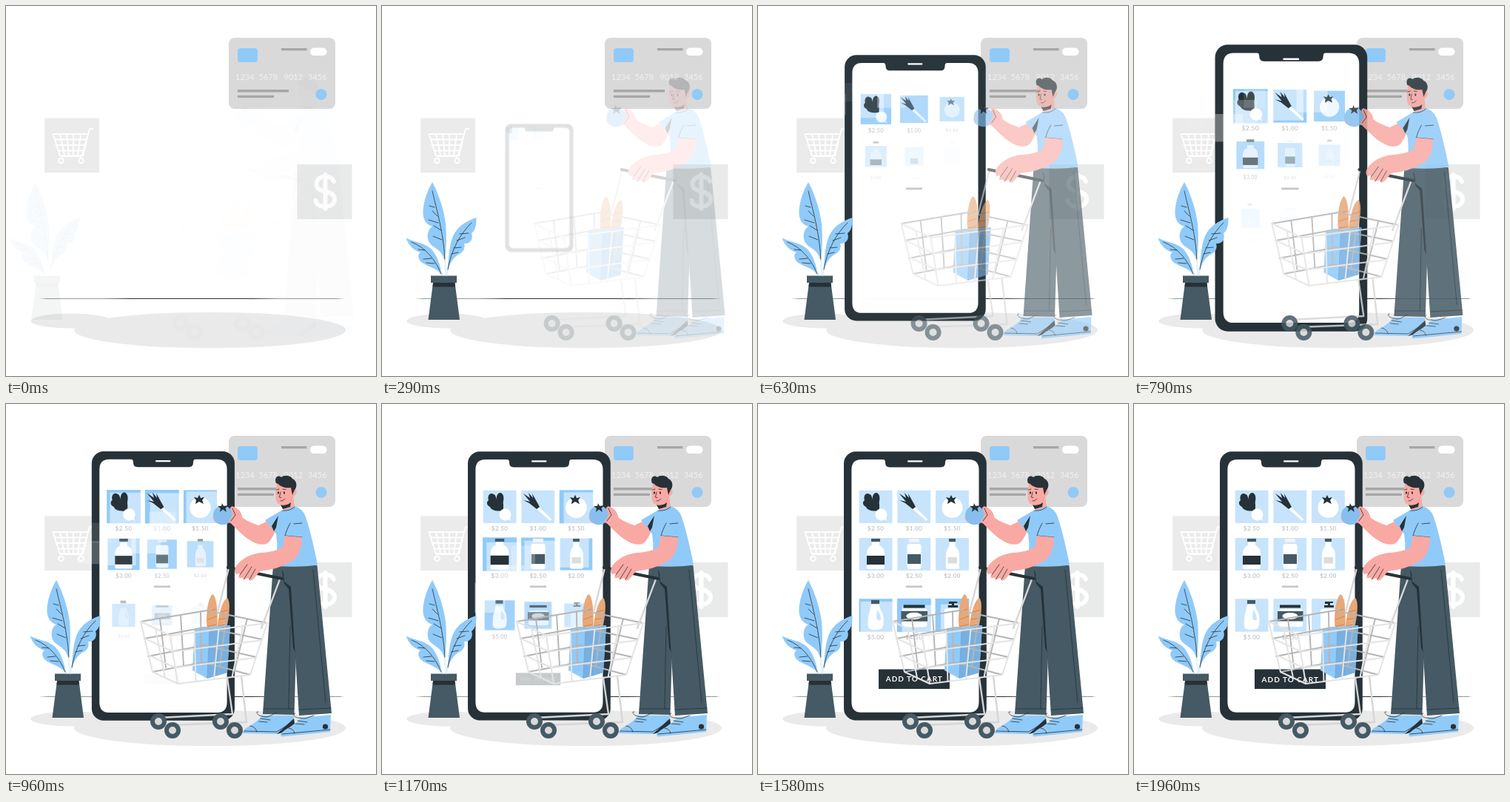
Recreate the animation shown at these times as an HTML page. Size 500 px wide and 500 px high, loop 2 s.

```html
<!DOCTYPE html>
<html lang="en">
<head>
<meta charset="utf-8">
<title>Online grocery shopping</title>
<style>
  html, body { margin: 0; width: 100%; height: 100%; overflow: hidden; background: #fff; }
  svg { display: block; width: 100vw; height: 100vh; }
  .part { transform-box: fill-box; transform-origin: center; }
  text { font-family: Lato, "Open Sans", sans-serif; }
  .price { font-size: 8px; letter-spacing: .4px; fill: #b3b3b3; text-anchor: middle; }
  .line { fill: none; stroke-linecap: round; stroke-linejoin: round; }
  .ink { fill: none; stroke: #263238; stroke-width: .8; stroke-linecap: round; stroke-linejoin: round; }
</style>
</head>
<body>
<svg viewBox="0 0 500 500">
  <!-- floor -->
  <ellipse cx="275.5" cy="438" rx="183.5" ry="24.3" fill="#eaeaea"/>
  <ellipse cx="88" cy="425.5" rx="54.5" ry="10" fill="#eaeaea"/>
  <ellipse cx="251" cy="395.5" rx="211" ry=".45" fill="#263238"/>

  <!-- bank card -->
  <rect x="301" y="43" width="144" height="96" rx="8" fill="#d9d9d9"/>
  <rect x="313" y="57" width="27" height="19" rx="4" fill="#90caf9"/>
  <path d="M372 57h34.500v3.300h-34.500zM313 113h69v3.500h-69zM313 120.800h49v3.300h-49z" fill="#a6a6a6"/>
  <rect x="411" y="56.500" width="22.500" height="10.500" rx="5.200" fill="#fff"/>
  <g fill="#f0f0f0" font-size="11">
    <text x="310" y="100">1234</text><text x="341.500" y="100">5678</text>
    <text x="375.500" y="100">9012</text><text x="408" y="100">3456</text>
  </g>
  <circle cx="426" cy="119.500" r="7.500" fill="#90caf9"/>

  <!-- cart tile -->
  <rect x="52" y="151.500" width="74" height="73.500" fill="#ebebeb"/>
  <g class="line" stroke="#fff" stroke-width="1.900">
    <path d="M117.500 166.300H113L102.500 203H76M63.500 173H111L104 202.500H73ZM65.500 180.500H109M67.500 188H107M70 195.500H105.500M73 173L79 202M82 173L85 202M91 173V202M101 173L97 202"/>
    <circle cx="74.500" cy="209" r="3.300"/><circle cx="101.500" cy="209" r="3.300"/>
  </g>

  <!-- dollar tile -->
  <rect x="393.500" y="214" width="74" height="74" fill="#e9eaea"/>
  <path class="line" stroke="#fff" stroke-width="6" d="M443 237C441 232 437 230.500 431.500 230.500C424 230.500 419.500 235 419.500 240.500C419.500 247 425 249 431.500 250.500C439 252 444 255 444 261C444 267 439 271 431.500 271C424 271 419.500 268 418.500 263M431.500 228V274"/>

  <g id="screen">
    <g id="phone">
      <rect x="116" y="64.300" width="192.800" height="363.200" rx="16" fill="#263238"/>
      <path d="M139.400 75H169Q172 75 172 79Q172 85.500 178 85.500H247Q253 85.500 253 79Q253 75 256 75H285Q298.500 75 298.500 89V402.700Q298.500 416.700 285 416.700H139.400Q126.400 416.700 126.400 402.700V89Q126.400 75 139.400 75Z" fill="#fff"/>
    </g>
    <g id="marks">
      <rect class="part" x="202" y="76.200" width="20.500" height="2.300" rx="1.100" fill="#fff"/>
      <rect class="part" x="200" y="245.500" width="22" height="2.700" fill="#c7c7c7"/>
    </g>
    <g id="shelf"></g>
    <g id="button">
      <rect class="part" x="163" y="358.500" width="96" height="26.500" fill="#263238"/>
      <text class="part" x="211.300" y="375.500" fill="#fff" font-size="10" font-weight="700" letter-spacing="1" text-anchor="middle">ADD TO CART</text>
    </g>
  </g>

  <g id="plant">
    <path d="M69 374H98.500L105 424H62.500Z" fill="#455a64"/>
    <path d="M69 374H98.500L99 379.500H68.500Z" fill="#263238"/>
    <rect x="66" y="364.500" width="35" height="9.500" fill="#455a64"/>
    <g fill="#90caf9">
      <path d="M68 238C61 250 55 266 55.500 281C56 290 61 296 68 298C61 302 60 313 64 320C70 328 82 329 84.500 345C87 330 88 305 85 288C82 270 76 253 68 238Z"/>
      <path d="M32.500 313.500C36 323 42 330 52 333C47 336 49 344 56 348C64 353 74 354 81 364C79 350 74 335 65 327C57 320 43 319 32.500 313.500Z"/>
      <path d="M127.500 286C114 290 101 299 96 311C90 325 90 345 88 362C90 350 96 340 103 336C110 333 113 327 111 321C118 322 124 316 121 307C127 303 127.500 294 127.500 286Z"/>
    </g>
    <path class="line" stroke="#dbeefd" stroke-width="1.500" d="M85 343L86 364M88 352V364M78 357L82 364"/>
    <path class="ink" d="M68 250C74 276 83 306 85 342M64 270L71 272M63 289L76 293M69 311L81 316M75 284L68 277M80 303L70 297M40 319C58 326 72 342 80 362M49 329L58 330M56 342L67 341M60 347L71 348M121 293C106 307 93 331 89 356M105 308L117 307M101 317L112 313M97 327L107 326M94 335L103 333"/>
  </g>

  <g id="shopper">
    <!-- shoes -->
    <path d="M320 443C324 435 337 434 346 421H389L390 431L368 446L321 445Z" fill="#90caf9"/>
    <path d="M366 446L389 425L390 432L374 444Z" fill="#263238"/>
    <path d="M371 447C375 438 390 437 398 424L439 420L438 443L372 449.500Z" fill="#90caf9"/>
    <circle cx="431.500" cy="436" r="3.600" fill="#263238"/>
    <!-- trousers -->
    <path d="M361 218L347 419L389.500 420L392 335L400 218Z" fill="#455a64"/>
    <path d="M373 224L386 246L393 340L388 330L382 250L376 243Z" fill="#263238"/>
    <path d="M374 218H420.500L440 418L396 421L385 247L376 240Z" fill="#455a64"/>
    <path class="ink" d="M384 300L382 412M348 412H389M396 413L439 411M415 224L432 404M341 416C337 414 339 422 347 422C354 425 359 420 365 417M342 429L353 430M344 425L357 427M391 418C386 417 390 426 398 424C404 427 411 422 416 421M391 432L403 433M394 428L407 430M322 442L366 443L388 429M373 446L438 440M330 435Q337 436 339 443M382 438Q389 439 390 445"/>
    <!-- neck and head -->
    <path d="M374 128L388 122L390 142L375 147Z" fill="#f9a9a3"/>
    <path d="M371 136Q379 138 385 133L384 139L374 142Z" fill="#263238"/>
    <path d="M366 108C364 117 363.500 129 367 134C372 138.500 382 137 386 130L387 125C393 125 395 115 389 114V105H368Z" fill="#f9a9a3"/>
    <path d="M365 107C362 100 367 95 372 99C377 95 385 97 387 101C393 103 394 112 390 116L387 123L385 113C378 114 371 112 368 108Z" fill="#263238"/>
    <g fill="#263238"><ellipse cx="368" cy="120" rx="1.100" ry="1.700"/><ellipse cx="376" cy="120" rx="1.100" ry="1.700"/></g>
    <path class="ink" d="M365.500 116L369 115M374 115L378 115.500M371 119L369.500 126L372 126.500M371 131Q374 132 377 128"/>
    <!-- reaching arm and tomato -->
    <path d="M354 158L341 164C333 161 325 158 319 153C319 147 314 140 305 138L302 145L306 150L302 160C308 164 316 175 328 183C340 191 350 192 356 186C361 179 365 171 366 164Z" fill="#f9a9a3"/>
    <path d="M279.500 152Q279 159 287 162L294 159Z" fill="#f9a9a3"/>
    <circle cx="293" cy="150.200" r="13" fill="#86bfef"/>
    <path d="M286 138L291 138L292 134L294 138L300 137L296.500 141L298 146L293 142.500L289 146L290 141Z" fill="#263238"/>
    <path class="line" stroke="#f9a9a3" stroke-width="4" d="M305 141L309 149L303 159"/>
    <path class="ink" d="M306 141L310 150L304 158"/>
    <!-- shirt -->
    <path d="M372 144Q383 143 389 138Q399 140 404 150Q412 172 421 217Q407 221 361 219Q369 202 365 176L362 171L350 157Z" fill="#90caf9"/>
    <path d="M368 151L359 165L362 172L365 167Z" fill="#263238"/>
    <path class="ink" d="M384 161Q379 170 377 178L400 180M389 162L400 161M373 144Q384 145 390 139"/>
    <!-- bag and bread -->
    <path d="M272 305C269 286 273 262 279 257C285 259 287 285 285 307Z" fill="#e8a879"/>
    <path d="M285 308C286 290 291 266 299 262C304 266 302 290 296 310Z" fill="#e8a879"/>
    <path class="line" stroke="#c98652" d="M274 281L283 277M273 291L284 287M273 300L284 298M291 281L301 278M288 291L300 289M287 300L298 298"/>
    <path d="M255 303L303 299L299 363L272 371L252 360Z" fill="#90caf9"/>
    <path d="M275 306L303 299L299 363L272 371Z" fill="#78b0e1"/>
    <path class="line" stroke="#6ca4d5" stroke-width=".8" d="M275 306L272 370M288 304L284 366"/>
    <!-- trolley -->
    <g class="line">
      <path stroke="#b5b5b5" stroke-width="1.900" d="M182 294L272 279L353 296M187 317L268 302L346 318M192 341L268 326L338 342M198 362L267 349L330 366M208 290L216 356M236 285L240 353M263 280L264 350M298 285L289 354M326 290L309 360"/>
      <path stroke="#d6d6d6" stroke-width="2.300" d="M301 222L286 281M370 237L345 303M299 370L306 419L206 424M318 368L325 430L218 434"/>
      <path id="basket" stroke="#e3e3e3" stroke-width="2"/>
    </g>
    <g fill="#d9d9d9" stroke="#455a64" stroke-width="6">
      <circle cx="206" cy="429" r="8"/><circle cx="225" cy="441" r="8"/>
      <circle cx="290" cy="429" r="8"/><circle cx="309" cy="441" r="8"/>
    </g>
    <path class="line" stroke="#263238" stroke-width="4" d="M300 221L373 236"/>
    <!-- near arm -->
    <path d="M377 178L374 193Q367 199 346 201C332 202 319 208 311 219Q307 226 311 230L316 229L314 235L320 235L321 238L327 235L330 239C336 237 339 230 343 226Q367 224 387 212Q400 202 400 180Z" fill="#f9a9a3"/>
    <path class="ink" d="M326 217L316 231M332 220L322 236M337 223L329 237"/>
  </g>
</svg>
<script>
const $ = id => document.getElementById(id);
const LOOP = 2000, SPAN = 1000, START = -37, STEP = 94;
const DARK = '#263238', SLATE = '#455a64';

// Trolley front: grid between four corners.
const mix = (a, b, u) => [a[0] + (b[0] - a[0]) * u, a[1] + (b[1] - a[1]) * u];
function grid(tl, tr, br, bl, cols, rows) {
  let d = '';
  const seg = (a, b) => { d += `M${a}L${b}`; };
  for (let i = 0; i <= cols; i++) seg(mix(tl, tr, i / cols), mix(bl, br, i / cols));
  for (let i = 0; i <= rows; i++) seg(mix(tl, bl, i / rows), mix(tr, br, i / rows));
  return d;
}
$('basket').setAttribute('d',
  grid([222, 313], [353, 296], [330, 366], [232, 378], 4, 3) +
  grid([182, 294], [222, 313], [232, 378], [198, 362], 2, 3));

// Product drawings; every piece grows around its own centre.
const shape = (d, fill = '#fff') => `<path class="part" d="${d}" fill="${fill}"/>`;
const box = (x, y, w, h, fill = '#fff', r = 0) =>
  `<rect class="part" x="${x}" y="${y}" width="${w}" height="${h}" rx="${r}" fill="${fill}"/>`;
const disc = (x, y, r, fill = '#fff') => `<circle class="part" cx="${x}" cy="${y}" r="${r}" fill="${fill}"/>`;

const items = [
  ['$2.50', shape('M164 144C158 145 148 145 146 139C141 137 141 132 144 130C142 124 146 119 151 122C154 123 154 127 155 129C154 122 159 117 163 122C166 127 163 132 164 136Z', DARK)
    + disc(166.5, 149.5, 8) + shape('M168 155L175 158L171 153Z')],
  ['$1.00', shape('M207 140L210 137L229.500 156L227 158Z')
    + shape('M191 121L200 127L198 120L204 127L203 121L213 139L209 142L199 134L191 130L200 132Z', DARK)],
  ['$1.50', disc(262.5, 140, 14)
    + shape('M254 126L259 127L261 123L263 127L268 126L265 130L267 135L261 132L256 135L257 130Z', DARK)],
  ['$3.00', box(153, 182, 12, 4, SLATE)
    + shape('M154 187H164V191Q171 194 171 202V221Q171 223 169 223H149Q147 223 147 221V202Q147 194 154 191Z')
    + box(147, 205, 24, 12, DARK)],
  ['$2.50', box(204, 182, 14, 5, '#f2f2f2') + box(201.5, 189, 19, 34, '#fff', 3) + box(202, 203, 18, 13, SLATE)],
  ['$2.00', box(258, 182, 9, 4, SLATE)
    + shape('M258.500 187H266.500V192Q272 197 272 204V221Q272 223 270 223H256Q254 223 254 221V204Q254 197 258.500 192Z')
    + box(256.5, 207, 12.5, 8.5, '#dcdcdc')],
  ['$5.00', box(153, 265, 11, 5, SLATE)
    + shape('M153 271H164Q164 277 168 282Q171 293 168 302Q166 305 158 305Q150 305 149 301Q148 288 151 281Z')
    + shape('M161 278Q166 284 166 291Q163 294 160 290Z', '#c8e4fc')],
  ['$4.50', box(197, 271.5, 28, 4, DARK) + box(195, 277, 33, 24, '#fff', 3) + box(194, 280, 34.5, 13.5, SLATE)
    + '<ellipse class="part" cx="211" cy="286.500" rx="10.500" ry="4.500" fill="#fff"/>'],
  ['', shape('M258 267H269V269H265V272H270V275H257V272H262V270H258Z', DARK)
    + box(252, 277, 23, 29, '#fff', 3)]
];
const columns = [136.8, 188.6, 240.2], rows = [116.8, 181, 263.5];
$('shelf').innerHTML = items.map(([price, art], i) => {
  const x = columns[i % 3], y = rows[Math.floor(i / 3)];
  return `<g>${box(x, y, 44.5, 44, '#90caf9')}
    <rect class="veil" x="${x}" y="${y}" width="44.5" height="44" fill="#fff"/>
    ${art}<text class="part price" x="${x + 22.3}" y="${y + 54}">${price}</text></g>`;
}).join('');

const products = [...$('shelf').children].map(g => ({
  parts: [...g.querySelectorAll('.part')],
  veil: g.querySelector('.veil')
}));
const marks = [...$('marks').children];
const buttonParts = [...$('button').children];

const clamp = v => Math.max(0, Math.min(1, v));
const bezier = (a, b, s) => 3 * (1 - s) * (1 - s) * s * a + 3 * (1 - s) * s * s * b + s ** 3;

// cubic-bezier(.36, -.01, .5, 1.38)
function spring(x) {
  if (x <= 0 || x >= 1) return clamp(x);
  let lo = 0, hi = 1;
  for (let i = 0; i < 24; i++) {
    const mid = (lo + hi) / 2;
    if (bezier(.36, .5, mid) < x) lo = mid; else hi = mid;
  }
  return bezier(-.01, 1.38, lo);
}

const pop = (t, start) => {
  const p = spring((t - start) / SPAN);
  return { scale: .5 + .5 * p, alpha: clamp(p) };
};
function grow(parts, { scale, alpha }) {
  for (const part of parts) {
    part.style.transform = `scale(${scale})`;
    part.style.opacity = alpha;
  }
}
function zoom(el, { scale, alpha }) {
  el.setAttribute('transform', `translate(212.5 245.8) scale(${scale}) translate(-212.5 -245.8)`);
  el.setAttribute('opacity', alpha);
}
function slide(el, from, p) {
  el.setAttribute('transform', `translate(${from * (1 - p)} 0)`);
  el.setAttribute('opacity', p);
}

function draw(t) {
  slide($('plant'), -30, clamp((t + 20) / 290) ** 1.1);
  slide($('shopper'), 30, clamp((t + 70) / 950) ** 1.6);
  const whole = pop(t, START);
  zoom($('screen'), whole);
  zoom($('phone'), whole);
  grow(marks, whole);
  products.forEach(({ parts, veil }, i) => {
    const state = pop(t, START + STEP * (i + 1));
    grow(parts, state);
    // The veil grows from the stage corner, so it drifts into place.
    veil.setAttribute('transform', `scale(${state.scale})`);
    veil.setAttribute('opacity', state.alpha * .5);
  });
  grow(buttonParts, pop(t, START + STEP * (items.length + 1)));
}

function tick() {
  draw(performance.now() % LOOP);
  requestAnimationFrame(tick);
}
tick();
</script>
</body>
</html>
```
